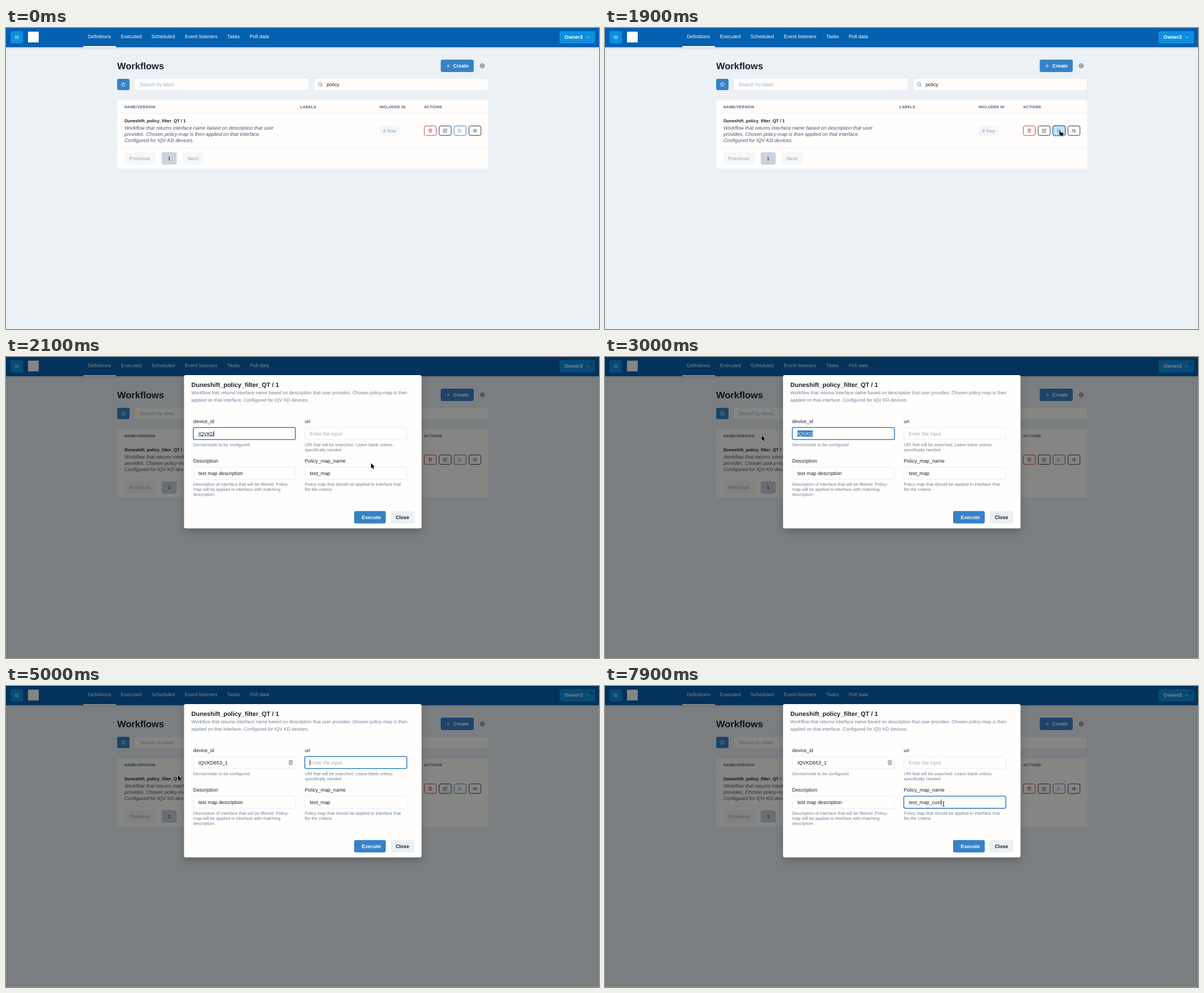
Write an HTML page that moves like this. It is 1051 px wide and 533 px high and loops after 8 s.

```html
<!DOCTYPE html>
<html lang="en">
<head>
<meta charset="utf-8">
<title>Workflows</title>
<style>
html, body { margin: 0; width: 100%; height: 100%; overflow: hidden; background: #ebf1f4; }
svg { display: block; width: 1051px; height: 533px; }
text { font-family: "Liberation Sans", Arial, sans-serif; text-rendering: geometricPrecision; white-space: pre; }
.bold { font-weight: 700; }
.italic { font-style: italic; }
.caps { font-weight: 700; letter-spacing: .05em; }
.bar { filter: drop-shadow(0 1px 2px rgba(0,0,0,.18)); }
.card { filter: drop-shadow(0 5px 7px rgba(0,0,0,.22)); }
</style>
</head>
<body>
<svg id="stage" viewBox="0 0 1051 533"></svg>
<script>
const LOOP = 8000, STEP = 100;
const WHITE = '#fffefd', INK = '#1a202c', SLATE = '#4a5568', GRAY = '#718096', PALE = '#a0aec0',
  LINE = '#e2e8f0', BLUE = '#3682c6', RED = '#b83434';
const TITLE = 'Duneshift_policy_filter_QT / 1', DEVICE = 'IQVKD';

const ICONS = {
  menu: 'M3 12h18M3 6h18M3 18h18',
  plus: 'M12 4v16M4 12h16',
  down: 'M6 9l6 6 6-6',
  star: 'M12 2l3.1 6.3 6.9 1-5 4.8 1.2 6.9-6.2-3.2-6.2 3.2L7 14.1 2 9.3l6.9-1z',
  search: 'M19 11a8 8 0 1 1-16 0a8 8 0 0 1 16 0M22 22l-5.3-5.3',
  trash: 'M3 6h18M19 6v14a2 2 0 0 1-2 2H7a2 2 0 0 1-2-2V6M8 6V4a2 2 0 0 1 2-2h4a2 2 0 0 1 2 2v2M10 11v6M14 11v6',
  edit: 'M11 4H4a2 2 0 0 0-2 2v14a2 2 0 0 0 2 2h14a2 2 0 0 0 2-2v-7M18.5 2.5a2.1 2.1 0 0 1 3 3L12 15l-4 1 1-4z',
  play: 'M5 3l14 9-14 9z',
  close: 'M4 4l16 16M20 4L4 20',
  gear: gearPath()
};

function gearPath() {
  const points = [];
  for (let i = 0; i < 32; i++) {
    const angle = (i - .5) * Math.PI / 16, r = i % 4 < 2 ? 11 : 8.4;
    points.push(`${12 + r * Math.cos(angle)} ${12 + r * Math.sin(angle)}`);
  }
  return `M${points.join('L')}zM15.5 12a3.5 3.5 0 1 1-7 0a3.5 3.5 0 0 1 7 0`;
}

const text = (x, y, str, size = 8.8, fill = INK, cls = '') =>
  `<text x="${x}" y="${y}" font-size="${size}" fill="${fill}" class="${cls}">${str}</text>`;
const lines = (x, y, gap, rows, ...style) => rows.map((row, i) => text(x, y + i * gap, row, ...style)).join('');
const rect = (x, y, w, h, fill, r = 0, extra = '') =>
  `<rect x="${x}" y="${y}" width="${w}" height="${h}" rx="${r}" fill="${fill}" ${extra}/>`;
const outline = (color, width) => `stroke="${color}" stroke-width="${width}"`;
const icon = (name, cx, cy, size, color, width = 2) =>
  `<path transform="translate(${cx - size / 2} ${cy - size / 2}) scale(${size / 24})" d="${ICONS[name]}" fill="none"
    stroke="${color}" stroke-width="${width}" stroke-linecap="round" stroke-linejoin="round"/>`;
const button = (x, y, w, h, fill, label, labelX, color) =>
  rect(x, y, w, h, fill, 3.3) + text(labelX, y + 13.8, label, 8.8, color, 'bold');
const field = (x, y, w, focused) => focused
  ? rect(x + .2, y + .2, w - .4, 21.6, WHITE, 3, outline(BLUE, 1.6))
  : rect(x + .3, y + .3, w - .6, 21.4, WHITE, 3, outline(LINE, .8));
const caret = (x, y) => rect(x, y, .8, 10, INK);

function header() {
  const tabs = { Definitions: 145, Executed: 203.7, Scheduled: 257.8, 'Event listeners': 317, Tasks: 392, 'Poll data': 432 };
  return rect(0, 0, 1051, 34, '#0560af', 0, 'class="bar"')
    + rect(8, 5.5, 22, 22, '#0c8fe0', 3.3) + icon('menu', 19, 16.5, 8.6, WHITE)
    + rect(39, 6.5, 19, 19, WHITE)
    + Object.entries(tabs).map(([name, x]) => text(x, 18.4, name, 8.8, WHITE)).join('')
    + rect(137, 32, 58, 2, WHITE)
    + button(981, 5.5, 63, 22, '#0c8fe0', 'Owner3', 989.8, WHITE) + icon('down', 1031, 16.5, 9, WHITE);
}

function actions(t) {
  const pressed = t >= 1900 && t < 2100, hovered = t >= 1300 && t < 1900;
  const list = [['trash', RED], ['edit', INK], ['play', '#2b6cb0'], ['menu', INK]];
  return list.map(([name, color], i) => {
    const x = 741.4 + i * 26.4, isPlay = name === 'play';
    const fill = isPlay && pressed ? '#c3e3f5' : isPlay && hovered ? '#ebf7fe' : WHITE;
    return (isPlay && pressed ? rect(x - .8, 172.6, 22.8, 18.4, 'none', 3.8, outline('#7fb2e0', 1.6)) : '')
      + rect(x, 173.4, 21.2, 16.8, fill, 2.8, outline(color, .9))
      + icon(name, x + 10.6, 181.8, 7.8, color);
  }).join('');
}

function page(t) {
  return rect(0, 0, 1051, 533, '#ebf1f4') + header()
    + text(197, 72.6, 'Workflows', 16.5, INK, 'bold')
    + button(770.5, 56, 58.5, 22, BLUE, 'Create', 792.8, WHITE) + icon('plus', 783.8, 67, 8.4, WHITE)
    + icon('gear', 844, 67, 8.8, INK)
    + rect(197, 90, 22, 20, BLUE, 3) + icon('star', 208, 100, 8.8, WHITE)
    + field(227.7, 89, 309.5) + text(236.8, 103, 'Search by label.', 8.8, PALE)
    + field(545.7, 89, 309.5) + icon('search', 556.8, 100, 8.6, SLATE) + text(568.2, 103, 'policy')
    + rect(197, 128, 658, 121, WHITE, 0, outline('#e9eef2', .4))
    + rect(197, 150.4, 658, .8, '#e6ecf1') + rect(197, 212.6, 658, .8, '#e6ecf1')
    + [['NAME/VERSION', 210], ['LABELS', 521.6], ['INCLUDED IN', 662], ['ACTIONS', 741]]
      .map(([name, x]) => text(x, 141.8, name, 6.6, SLATE, 'caps')).join('')
    + text(210, 167, TITLE, 7.7, INK, 'bold')
    + lines(210, 179.7, 11, ['Workflow that returns interface name based on description that user',
      'provides. Chosen policy-map is then applied on that interface.', 'Configured for IQV KD devices.'], 8.8, SLATE, 'italic')
    + rect(662, 173.5, 36, 17, '#f4f7f9', 3) + text(668.7, 184.6, '0 Tree', 7.7, '#a3aab4', 'bold')
    + actions(t)
    + button(210, 220, 55, 22, '#f5f7f9', 'Previous', 218.8, '#b4bac2')
    + button(276, 220, 26.5, 22, '#cad3dd', '1', 286.7, SLATE)
    + button(313.7, 220, 36.3, 22, '#f5f7f9', 'Next', 322, '#b4bac2');
}

function deviceField(t) {
  const x = 341, end = 368.4, focused = t >= 2100 && t < 4900;
  const label = color => text(x, 138.5, DEVICE, 8.8, color);
  let body;
  if (t >= 4400) {
    body = text(x, 138.5, DEVICE + '653_1') + (focused ? caret(392.8, 130.5) : '');
  } else if (t >= 2800) {
    const start = Math.max(x, Math.min(end, pointer(Math.min(t, 3100))[0]));
    body = label(INK) + rect(start, 130, end - start, 11, BLUE)
      + `<clipPath id="picked">${rect(start, 130, end - start, 11, INK)}</clipPath><g clip-path="url(#picked)">${label('#dbeafa')}</g>`;
  } else {
    body = label(INK) + caret(end, 130.5) + (focused ? rect(x, 139.6, end - x, .7, INK) : '');
  }
  const hint = t >= 2800 && t < 3000 || t >= 3300;
  return field(331.8, 124.5, 181.4, focused) + body + (hint
    ? rect(502, 132, 5.4, 7, '#f4f4f4', .6, outline('#666', .9)) + '<path d="M503.8 133.8h1.8M504.7 133.8v3.6M503.8 137.4h1.8" stroke="#555" stroke-width=".7"/>' : '');
}

function modal(t) {
  const added = [7000, 7500, 7600, 7800, 7900].filter(at => t >= at).length;
  const caretX = [574.9, 579.8, 584.2, 589, 593.4, 595.9][added];
  const onUri = t >= 4900 && t < 5700, onDescription = t >= 5700 && t < 6300, onMap = t >= 6300;
  const help = (x, y, rows) => lines(x, y, 8.75, rows, 7.7, GRAY);
  return rect(315.5, 32, 421, 271.5, WHITE, 3.3, 'class="card"')
    + text(328.6, 52.7, TITLE, 11, INK, 'bold')
    + lines(328.6, 66, 12.5, ['Workflow that returns interface name based on description that user provides. Chosen policy-map is then',
      'applied on that interface. Configured for IQV KD devices.'], 8.25, GRAY)
    + text(331.8, 116.5, 'device_id') + deviceField(t) + help(331.8, 158, ['Device/node to be configured'])
    + text(529.5, 116.5, 'uri') + field(529.3, 124.5, 181.4, onUri)
    + text(538.5, 138.5, 'Enter the input', 8.8, PALE) + (onUri ? caret(538.2, 130.5) : '')
    + help(529.5, 158, ['URI that will be searched. Leave blank unless', 'specifically needed'])
    + text(331.8, 186.7, 'Description') + field(331.8, 194.8, 181.4, onDescription)
    + text(341, 208.7, 'test map description') + (onDescription ? caret(419.7, 200.7) : '')
    + help(331.8, 228.3, ['Description of interface that will be filtered. Policy-', 'map will be applied to interface with matching', 'description.'])
    + text(529.5, 186.7, 'Policy_map_name') + field(529.3, 194.8, 181.4, onMap)
    + text(538.5, 208.7, 'test_map' + '_cust'.slice(0, added)) + (onMap ? caret(caretX, 200.7) : '')
    + help(529.5, 228.3, ['Policy map that should be applied to interface that', 'fits the criteria'])
    + button(617, 272.8, 56, 22, BLUE, 'Execute', 630.6, WHITE)
    + button(682, 272.8, 41.5, 22, '#ebf0f4', 'Close', 690.7, INK);
}

// Pointer stops: time, x, y
const STOPS = [[300, 609, 481], [500, 645, 425], [700, 722, 270], [900, 765, 178], [1100, 777, 185], [1300, 804, 181],
  [2000, 804, 181], [2100, 647, 188], [2300, 520, 150], [2700, 390, 137], [2800, 365, 137], [3100, 234, 140],
  [3200, 234, 140], [3600, 258, 131], [3900, 272.6, 133.6], [4800, 273, 134], [5200, 337, 183], [5500, 503, 205],
  [5600, 503, 205], [6000, 584, 207], [6400, 600, 209], [8000, 600, 209]];

function pointer(t) {
  const i = Math.max(1, STOPS.findIndex(stop => stop[0] >= t));
  const [t0, x0, y0] = STOPS[i - 1], [t1, x1, y1] = STOPS[i];
  const k = (t - t0) / (t1 - t0);
  return [x0 + (x1 - x0) * k, y0 + (y1 - y0) * k];
}

function cursor(t) {
  if (t < 300) return '';
  const [x, y] = pointer(t);
  const place = `transform="translate(${x} ${y})"`;
  const overField = t > 2100 && x > 332 && x < 711 && (y > 124 && y < 147 || y > 195 && y < 217);
  if (overField) {
    const beam = 'd="M-1.6 -4h1.1q.5 0 .5 .6v6.8q0 .6 -.5 .6h-1.1M1.6 -4h-1.1q-.5 0 -.5 .6M0 3.4q0 .6 .5 .6h1.1" fill="none"';
    return `<g ${place}><path ${beam} ${outline('#fff', 2)}/><path ${beam} ${outline('#111', 1)}/></g>`;
  }
  const shape = t >= 1500 && t < 2000
    ? 'M1.2 .4q1-.8 1.6 .2v3l4.2 .8q1.4 .3 1.3 1.6l-.4 3.6h-4.6l-3-3.6q-.2-1 1-.8l.5 .5z'
    : 'M0 0v9.2l2.1-2 1.4 3.3 1.6-.7-1.4-3.2h2.9z';
  return `<path ${place} d="${shape}" fill="#080808" ${outline('#f4f4f4', .7)} stroke-linejoin="round" paint-order="stroke"/>`;
}

function scene(t) {
  const shown = t < 2000 ? 0 : t < 2100 ? .66 : 1;
  if (!shown) return page(t) + cursor(t);
  const scale = .95 + .05 * (shown < 1 ? .7 : 1);
  return page(t) + rect(0, 0, 1051, 533, '#000', 0, `opacity="${.48 * shown}"`)
    + icon('close', 1037.3, 12.4, 9, '#111', 2.2)
    + `<g opacity="${shown}" transform="translate(526 167.75) scale(${scale}) translate(-526 -167.75)">${modal(t)}</g>`
    + cursor(t);
}

const stage = document.getElementById('stage');
let last = -1;
function draw(now) {
  const t = Math.floor(now % LOOP / STEP) * STEP;
  if (t !== last) stage.innerHTML = scene(last = t);
  requestAnimationFrame(draw);
}
draw(performance.now());
</script>
</body>
</html>
```
